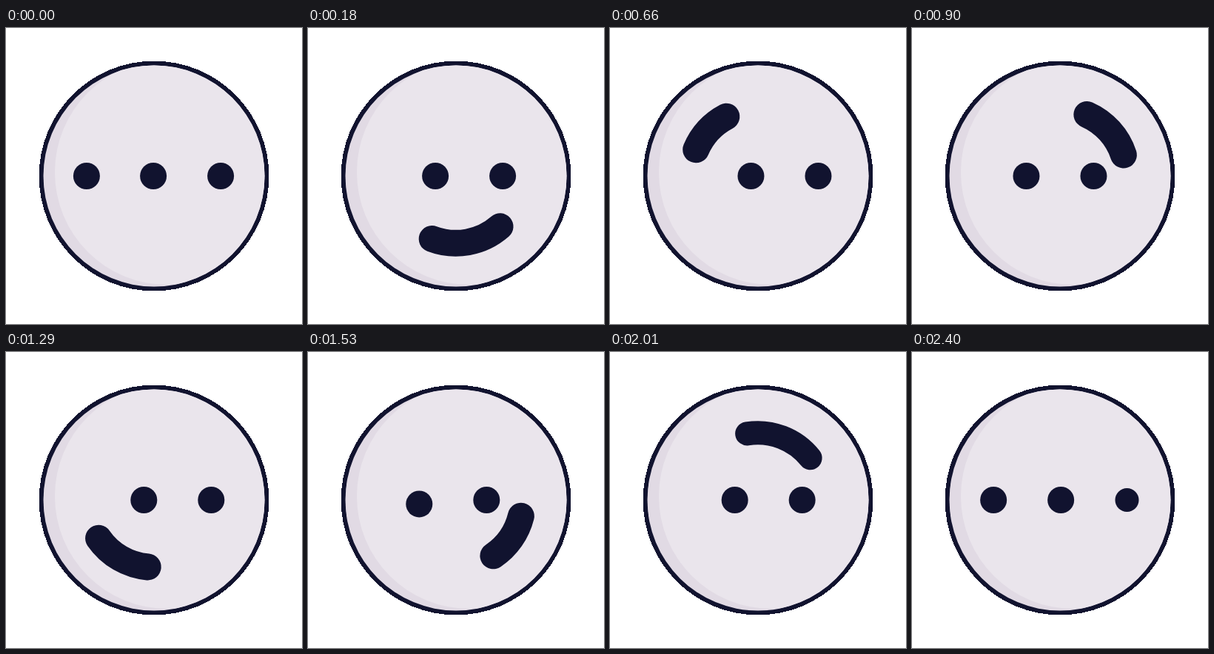
An HTML page that plays this animation: 400 px wide and 400 px high, repeating every 3960 ms.

```html
<!DOCTYPE html>
<html lang="en">
<head>
<meta charset="utf-8">
<title>Three dots</title>
<style>
  html, body { margin: 0; width: 100%; height: 100%; overflow: hidden; background: #fff; }
  svg { display: block; width: 100vw; height: 100vh; }
  .ink { fill: #11132f; }
  #trail { fill: none; stroke: #11132f; stroke-linecap: round; }
</style>
</head>
<body>
<svg viewBox="0 0 400 400">
  <defs><clipPath id="face"><circle cx="200" cy="200" r="149.5"/></clipPath></defs>
  <circle class="ink" cx="200" cy="200" r="155.4" shape-rendering="crispEdges"/>
  <circle cx="200" cy="200" r="149.5" fill="#e1dae4"/>
  <circle cx="218" cy="195" r="152" fill="#eae5ec" clip-path="url(#face)"/>
  <circle id="mid" class="ink" r="18"/>
  <circle id="right" class="ink" r="18"/>
  <path id="trail"/>
</svg>
<script>
const LOOP = 3960, STEP = 30, SWING = 600, SWINGS = 4;
const GAP = 91, SHIFT = 90, RADIUS = 90.8, HOP = 17.5;

const [mid, right, trail] = ['mid', 'right', 'trail'].map(id => document.getElementById(id));

// Progress of the trail's two ends along the arc
const head = x => 1 - (1 - x) ** (4.2 - 1.8 * x);
const tail = x => x * (1 + .143 * (1 + Math.cos(Math.PI * x ** 2.5)));

function place(dot, x, y) {
  dot.setAttribute('cx', x);
  dot.setAttribute('cy', y);
}

function arcPoint(side, p) {
  const a = Math.PI * (1 - p);
  const x = 199.7 + RADIUS * Math.cos(a), y = 200 + side * RADIUS * Math.sin(a);
  return `${x.toFixed(2)} ${y.toFixed(2)}`;
}

function draw(ms) {
  const t = Math.min(Math.floor(ms % LOOP / STEP) * STEP, SWINGS * SWING);
  const n = Math.min(Math.floor(t / SWING), SWINGS - 1);
  const phase = t / SWING - n;
  const side = n % 2 ? -1 : 1;
  const hop = HOP * Math.max(0, -Math.sin(phase * 2 * Math.PI));
  const x = 199.1 + .35 * n - SHIFT * phase;

  place(mid, x, 200 + side * hop);
  place(right, x + GAP, 200);

  const from = arcPoint(side, tail(phase)), to = arcPoint(side, head(phase));
  const bend = from === to ? 'l.01 0' : `A${RADIUS} ${RADIUS} 0 0 ${n % 2} ${to}`;
  trail.setAttribute('d', `M${from}${bend}`);
  // The last swing is thinner
  trail.setAttribute('stroke-width', n === SWINGS - 1 ? 32 : 36);
}

const start = performance.now();
function tick() {
  draw(performance.now() - start);
  requestAnimationFrame(tick);
}
tick();
</script>
</body>
</html>
```
